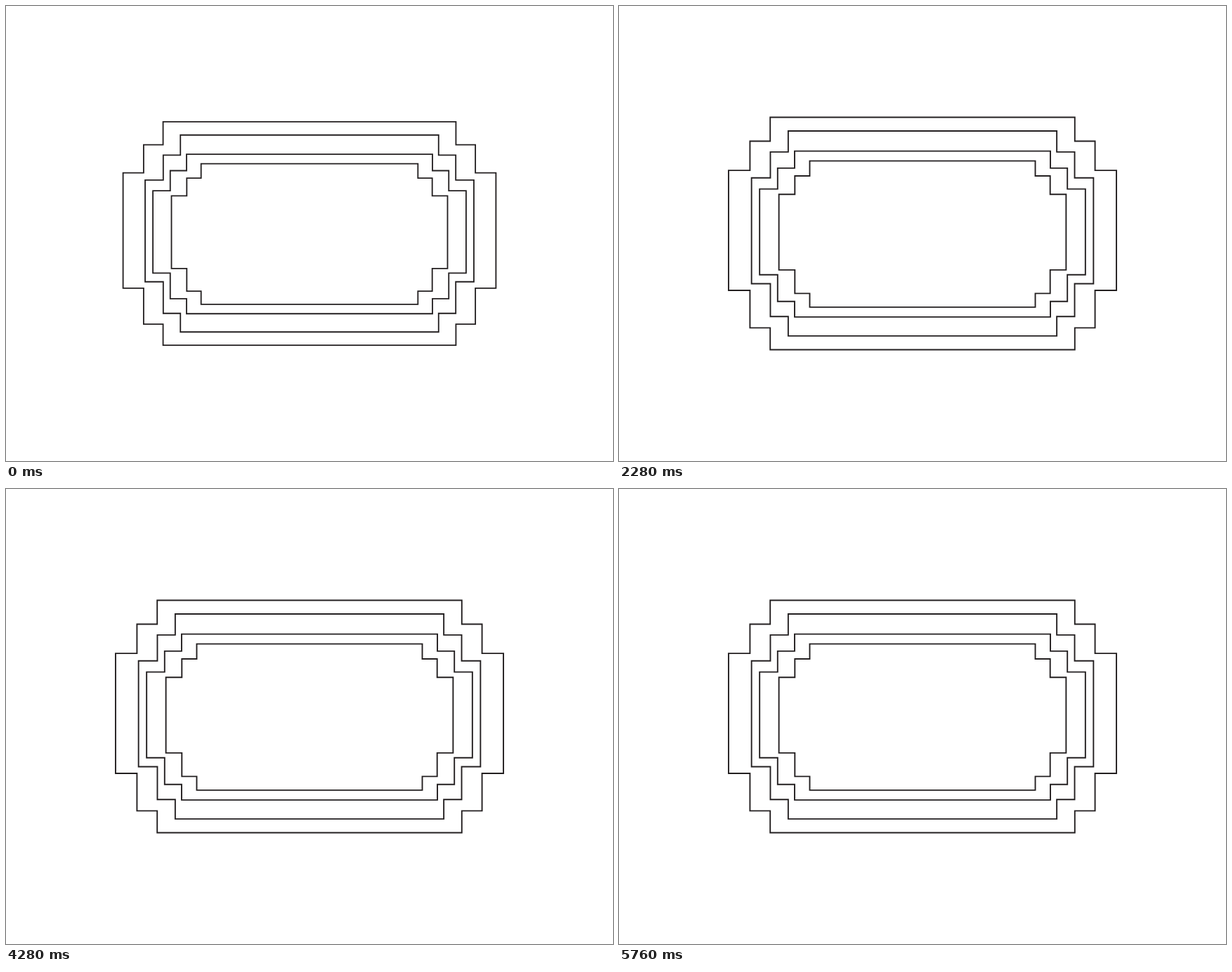
An HTML page that plays this animation: 864 by 648 pixels, repeating every 6 s.

```html
<!DOCTYPE html>
<html lang="en">
<head>
<meta charset="utf-8">
<title>Pulsing frames</title>
<style>
  html, body { margin: 0; width: 100%; height: 100%; overflow: hidden; background: #fff; }
  svg { display: block; width: 100vw; height: 100vh; }
  path { fill: none; stroke: #231f20; stroke-width: 2.3; stroke-linejoin: miter; }
</style>
</head>
<body>
<svg viewBox="0 0 864 648"><g id="frames"></g></svg>
<script>
  const CENTER = [432, 324.2];
  const MIN_SCALE = 0.7955;
  const HALF_CYCLE = 1000;
  const STEP_STARTS = [0, 280, 520, 760];

  // Half-widths from outside in, then the six edge heights from top to bottom.
  const RINGS = [
    { x: [333.6, 296.8, 262], y: [-200.2, -159.2, -108.9, 97.7, 162.1, 199.7] },
    { x: [294.1, 261.7, 231], y: [-176.6, -140.6, -96, 86.2, 142.7, 176.1] },
    { x: [280.2, 249.2, 220], y: [-142.1, -112.8, -76.8, 70.7, 116.6, 143.4] },
    { x: [247, 219.6, 194], y: [-125.2, -99.4, -67.7, 62.4, 102.9, 126.5] }
  ];

  const group = document.getElementById('frames');

  function ringPath({ x: [a, b, c], y: [t, u, v, w, p, q] }) {
    return `M${-c} ${t}H${c}V${u}H${b}V${v}H${a}V${w}H${b}V${p}H${c}V${q}` +
           `H${-c}V${p}H${-b}V${w}H${-a}V${v}H${-b}V${u}H${-c}Z`;
  }

  for (const ring of RINGS) {
    const path = document.createElementNS('http://www.w3.org/2000/svg', 'path');
    path.setAttribute('d', ringPath(ring));
    group.append(path);
  }

  const smoothstep = p => p * p * (3 - 2 * p);

  // The pulse grows and shrinks in four held steps per half cycle.
  function scaleAt(ms) {
    const t = ms % (2 * HALF_CYCLE);
    const shrinking = t >= HALF_CYCLE;
    const local = t % HALF_CYCLE;
    const p = STEP_STARTS.filter(start => start <= local).length - 1;
    const grown = smoothstep((shrinking ? 4 - p : p) / 4);
    return MIN_SCALE + (1 - MIN_SCALE) * grown;
  }

  function render(ms) {
    group.setAttribute('transform', `translate(${CENTER}) scale(${scaleAt(ms)})`);
  }

  const start = performance.now();
  function tick() {
    render(performance.now() - start);
    requestAnimationFrame(tick);
  }
  tick();
</script>
</body>
</html>
```
